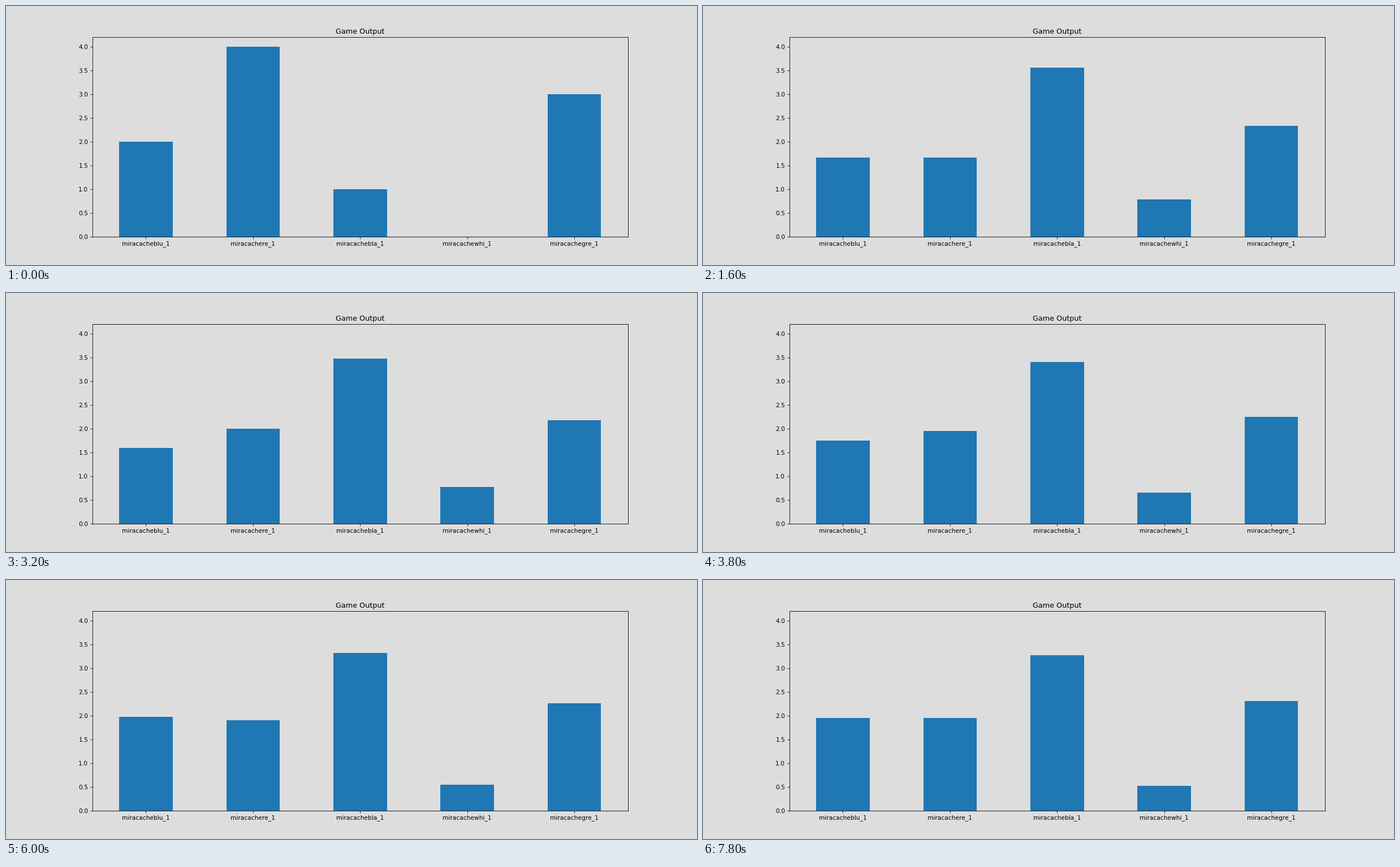
Write a matplotlib script that moves like this. It is 1222 by 458 pixels and loops after 8 s.

```python
import matplotlib.pyplot as plt
import numpy as np
from matplotlib.animation import FuncAnimation

W, H = 1222, 458
DPI = W / 16  # a 16 inch wide figure
STEP_MS = 200
BACK = "#dddddd"

# b = blue, r = red, k = black, w = white, g = green
PLAYERS = {
    "b": "miracacheblu_1",
    "r": "miracachere_1",
    "k": "miracachebla_1",
    "w": "miracachewhi_1",
    "g": "miracachegre_1",
}

# Finishing order of each game, best to worst
GAMES = """
    rgbkw kgbrw kbgrw kgbwr kgwrb kbrwg kbgwr rkgwb
    kgrwb kgrbw krbgw kgbwr rgkwb kbgrw rkbwg rkbwg
    gkwrb gkrbw kbrgw bgkrw gkbrw rkbgw krgbw bgkwr
    rkbwg kbgrw bkgwr kgrbw gkbrw bkrwg gkrbw gkrbw
    kbrgw rkbgw gkrbw bkgwr rgkbw gkbrw rkgbw kwbgr
""".split()


def points(order):
    """Four points for the winner, down to none for the last."""
    return [len(order) - 1 - order.index(p) for p in PLAYERS]


totals = np.cumsum([points(order) for order in GAMES], axis=0)
played = np.arange(1, len(GAMES) + 1)[:, None]
means = totals / played

fig, ax = plt.subplots(figsize=(W / DPI, H / DPI), dpi=DPI, facecolor=BACK)
ax.set_facecolor(BACK)
slots = np.arange(len(PLAYERS))
bars = ax.bar(slots, means[0], width=0.5, color="#1f77b4")
ax.set_xticks(slots, list(PLAYERS.values()))
ax.set_xlim(-0.5, len(PLAYERS) - 0.5)
ax.set_ylim(0, 4.2)
ax.set_title("Game Output")


def draw(i):
    for bar, mean in zip(bars, means[i]):
        bar.set_height(mean)
    return list(bars)


anim = FuncAnimation(fig, draw, frames=len(GAMES), interval=STEP_MS,
                     init_func=lambda: draw(0), repeat=True, repeat_delay=0)
plt.show()
```
